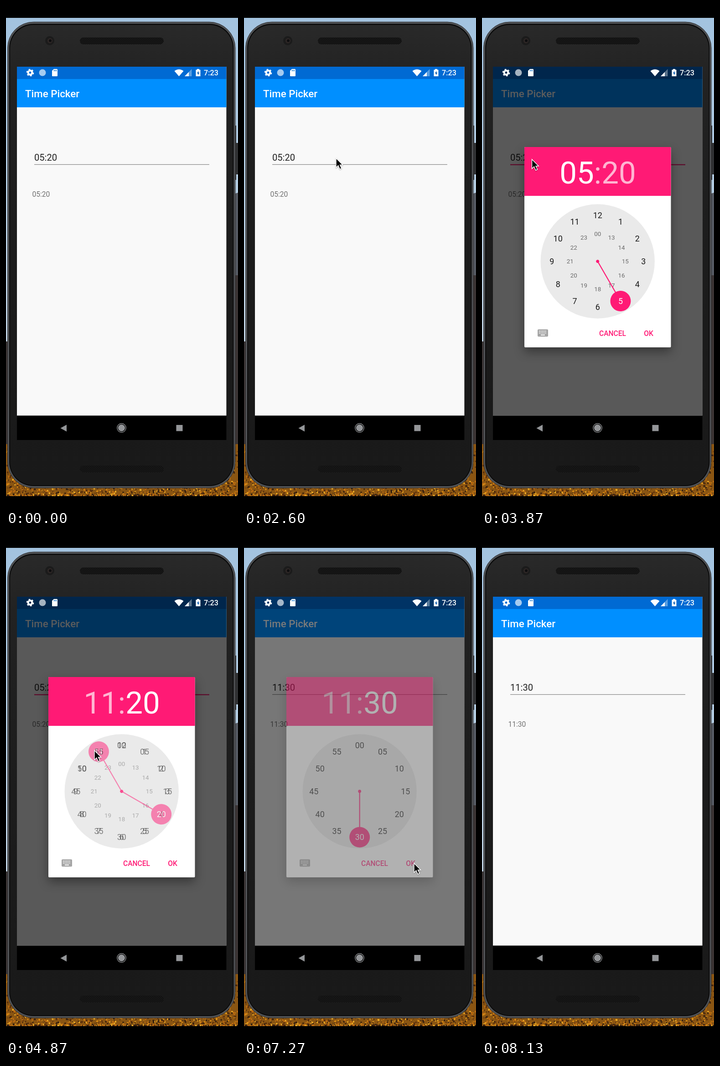
An HTML page for the animation above (8530 ms loop, 509 by 1100 pixels).

```html
<!DOCTYPE html>
<html lang="en">
<head>
<meta charset="utf-8">
<title>Time Picker</title>
<style>
  html, body { margin: 0; width: 100%; height: 100%; overflow: hidden; background: #000; }
  svg { display: block; font-family: Roboto, sans-serif; }
  .mid { text-anchor: middle; }
  .bold { font-weight: 500; }
  .shadow { filter: drop-shadow(0 10px 11px rgba(0, 0, 0, .38)); }
</style>
</head>
<body>
<svg width="509" height="1100" viewBox="0 0 509 1100">
  <defs>
    <linearGradient id="sky" x2="0" y2="1">
      <stop offset="0" stop-color="#a3c3df"/><stop offset=".5" stop-color="#b9cfe2"/><stop offset="1" stop-color="#c3cfda"/>
    </linearGradient>
    <linearGradient id="shell" x2="0" y2="1">
      <stop offset="0" stop-color="#292929"/><stop offset=".12" stop-color="#222"/>
      <stop offset=".5" stop-color="#1c1c1c"/><stop offset="1" stop-color="#191919"/>
    </linearGradient>
    <pattern id="mesh" width="4" height="4" patternUnits="userSpaceOnUse">
      <rect width="4" height="4" fill="#1d1d1d"/><circle cx="1" cy="1" r="1" fill="#060606"/><circle cx="3" cy="3" r="1" fill="#060606"/>
    </pattern>
    <g id="keys">
      <rect width="23" height="16" rx="2"/>
      <path d="M3 4h17M3 8h17" stroke="#fff" stroke-width="2" stroke-dasharray="2 1.4"/>
      <path d="M7 12.3h9" stroke="#fff" stroke-width="2"/>
    </g>
  </defs>

  <!-- landscape -->
  <rect y="26" width="509" height="1048" fill="url(#sky)"/>
  <path d="M490 415l19-6v340h-19z" fill="#555962"/>
  <path d="M490 590h19v370h-19zM0 735h12v230H0z" fill="#3b3434"/>
  <rect y="960" width="509" height="114" fill="#8a5512"/>
  <g id="leaves"></g>

  <!-- phone -->
  <path d="M500 262h5v38h4v69h-4v12h-5z" fill="#303133"/>
  <rect x="3.5" y="35" width="499.5" height="1021" rx="57" fill="#515356" stroke="#2c2d2f"/>
  <rect x="7" y="39" width="492.5" height="1013" rx="53" fill="#0a0a0a"/>
  <rect x="9" y="41.5" width="488.5" height="1008.5" rx="51" fill="url(#shell)"/>
  <rect x="162" y="69" width="184" height="15" rx="7.5" fill="url(#mesh)"/>
  <rect x="162" y="1007" width="184" height="15" rx="7.5" fill="url(#mesh)"/>
  <circle cx="96" cy="76" r="10" fill="#1b1b1b"/><circle cx="96.500" cy="76" r="5.500" fill="#2e2726"/><circle cx="97" cy="76" r="3" fill="#0d0d0f"/>

  <!-- app -->
  <rect x="24" y="133" width="459.500" height="818" fill="#000"/>
  <rect x="24" y="133" width="459.500" height="764.500" fill="#f9f9f9"/>
  <rect x="24" y="133" width="459.500" height="27" fill="#006ad3"/>
  <rect x="24" y="160" width="459.500" height="62" fill="#008fff"/>
  <text x="42" y="199.500" font-size="22.300" class="bold" fill="#fff">Time Picker</text>
  <text id="field" x="62" y="339" font-size="20.100" fill="#212121"></text>
  <rect id="line" x="62" width="384"/>
  <text id="label" x="57.500" y="418" font-size="15.600" fill="#707070"></text>
  <rect id="dim" x="24" y="133" width="459.500" height="764.500"/>

  <!-- status bar -->
  <g fill="#fff">
    <circle cx="53" cy="146" r="4.400" fill="none" stroke="#fff" stroke-width="4"/>
    <circle cx="53" cy="146" r="7.300" fill="none" stroke="#fff" stroke-width="2" stroke-dasharray="3.800 3.840"/>
    <circle cx="80" cy="146" r="7.500" opacity=".65"/>
    <path d="M105 138h6.500q1.500 0 1.500 1.500v13q0 1.500-1.500 1.500h-9q-1.500 0-1.500-1.500V142z"/>
    <path d="M105.500 140v3M108 140v3M110.500 140v3" stroke="#0069c8" stroke-width="1.200"/>
    <path d="M369.500 142.500q10-7.500 20 0l-10 11.500z"/>
    <path d="M392 154l15.500-16v16z" opacity=".35"/><path d="M392 154l9-9.300v9.300z"/>
    <path d="M419 138h5v1.800h2.500V154h-10v-14.200h2.500z"/>
    <path d="M422.300 142l-3.300 5.800h2v4l3.300-5.800h-2z" fill="#0058b0"/>
    <text x="434" y="152" font-size="16.200" class="bold">7:23</text>
  </g>

  <!-- navigation bar -->
  <g fill="#949699">
    <path id="back"/>
    <circle cx="253.500" cy="924.500" r="7.600"/>
    <circle cx="253.500" cy="924.500" r="9.700" fill="none" stroke="#a4a6a9" stroke-width="1.200"/>
    <rect x="373.500" y="918" width="14" height="13.500"/>
    <use id="ime" href="#keys" x="421" y="917"/>
  </g>

  <!-- dialog -->
  <g id="dialog">
    <rect x="93" y="309" width="321.500" height="439" rx="2" fill="#fff" class="shadow"/>
    <path d="M93 416V311q0-2 2-2h317.500q2 0 2 2v105z" fill="#ff1a75"/>
    <text x="254" y="389" font-size="67.200" class="mid" fill="#fff"><tspan id="hh"></tspan><tspan fill-opacity=".68">:</tspan><tspan id="mm"></tspan></text>
    <circle cx="253.700" cy="559.500" r="125.200" fill="#eaeaea"/>
    <g id="hours"><g id="hourNums"></g><g id="hourHand"></g></g>
    <g id="mins"><g id="minNums"></g><g id="minHand"></g></g>
    <use href="#keys" x="122" y="708.500" fill="#a5a5a5"/>
    <g font-size="15.600" class="mid bold" fill="#ff1a75">
      <text x="286.500" y="722.500">CANCEL</text><text x="365.500" y="722.500">OK</text>
    </g>
  </g>

  <path id="cursor" d="M0 0V20.500L4.700 16L8.300 24L12 22.400L8.500 14.700H14.700Z" fill="#000" stroke="#fff" stroke-width="1.400"
    style="filter: drop-shadow(0 1px 1px rgba(0, 0, 0, .35))"/>
</svg>
<script>
const $ = id => document.getElementById(id);
const set = (id, attrs) => { for (const k in attrs) $(id).setAttribute(k, attrs[k]); };
const CX = 253.7, CY = 559.5, OUTER = 100.5, INNER = 60.5;
const pad = n => String(n).padStart(2, '0');

// Foliage specks from a seeded generator
let seed = 7;
const rnd = () => (seed = seed * 16807 % 2147483647) / 2147483647;
$('leaves').innerHTML = ['#d98a12', '#f0ae25', '#5a2e0c', '#c06c10', '#38210f'].map(color => {
  let d = '';
  for (let i = 0; i < 420; i++) {
    const y = 1074 - 114 * rnd() ** 2, x = rnd() * 507, s = 1 + rnd() * 3;
    d += `M${x.toFixed(1)} ${Math.min(y, 1074 - s).toFixed(1)}h${s.toFixed(1)}v${s.toFixed(1)}h${(-s).toFixed(1)}z`;
  }
  return `<path d="${d}" fill="${color}"/>`;
}).join('');

// Dial parts
function num(text, step, r, size, fill) {
  const a = step * Math.PI / 6;
  return `<text class="mid" x="${CX + r * Math.sin(a)}" y="${CY - r * Math.cos(a) + size * .36}" font-size="${size}" fill="${fill}">${text}</text>`;
}
const ring = (label, r, size, fill) =>
  Array.from({ length: 12 }, (_, i) => num(label(i), i, r, size, fill)).join('');
const hand = (step, text) =>
  `<g transform="rotate(${step * 30} ${CX} ${CY})" fill="#ff1a75"><circle cx="${CX}" cy="${CY}" r="3.4"/>
   <rect x="${CX - 1.1}" y="${CY - OUTER}" width="2.2" height="${OUTER}"/>
   <circle cx="${CX}" cy="${CY - OUTER}" r="22.5"/></g>` + num(text, step, OUTER, 17.9, '#fff');

$('hourNums').innerHTML = ring(i => i || 12, OUTER, 17.9, '#1a1a1a')
  + ring(i => i ? i + 12 : '00', INNER, 13.4, '#6a6a6a');
$('minNums').innerHTML = ring(i => pad(i * 5), OUTER, 17.9, '#1a1a1a');

// Keys are [time, value...]; values ease between neighbours
function at(keys, t, ease = p => p) {
  let i = keys.findIndex(k => k[0] > t);
  if (i < 0) i = keys.length;
  if (i === 0) return keys[0].slice(1);
  const a = keys[i - 1], b = keys[i] || a;
  const p = b === a ? 0 : ease((t - a[0]) / (b[0] - a[0]));
  return a.slice(1).map((v, j) => v + (b[j + 1] - v) * p);
}
const smooth = p => p * p * (3 - 2 * p);

const enter = [[1200, 472, 602], [1667, 218, 335]];
const moves = [
  [2533, 218, 335], [2600, 202, 333.5], [2933, 109.5, 336],
  [3900, 109.5, 336], [4267, 133, 385], [4533, 194, 470],
  [5400, 194, 470], [5600, 151, 545], [5933, 258.5, 653],
  [6400, 258.5, 653], [6780, 387, 721], [7000, 373, 717]];
const dim = [[3400, 0], [3467, .22], [3533, .42], [3600, .555], [3733, .64],
  [7200, .64], [7267, .52], [7333, .36], [7400, .2], [7533, 0]];
const alpha = [[3400, 0], [3467, .35], [3533, .82], [3600, 1],
  [7200, 1], [7267, .43], [7333, .12], [7400, 0]];

function draw(t) {
  const hour = t < 4590 ? 5 : 11, min = t < 6060 ? 20 : 30;
  const value = t < 7260 ? '05:20' : '11:30';
  const focus = t >= 3260 && t < 7260, ime = t >= 3460 && t < 3790;
  const onMin = t >= 4660, swap = at([[4600, 0], [5130, 1]], t)[0];

  $('field').textContent = $('label').textContent = value;
  set('line', { y: focus ? 346.6 : 346.8, height: focus ? 2.2 : 1.2, fill: focus ? '#ff1a75' : '#858585' });
  set('dim', { opacity: at(dim, t)[0] });
  set('dialog', { opacity: at(alpha, t)[0] });
  set('back', { d: ime ? 'M119 918h15l-7.500 14z' : 'M119.500 925L133 917.500v15z' });
  set('ime', { opacity: +ime });

  $('hh').textContent = pad(hour);
  $('mm').textContent = min;
  set('hh', { 'fill-opacity': onMin ? .68 : 1 });
  set('mm', { 'fill-opacity': onMin ? 1 : .68 });
  $('hourHand').innerHTML = hand(hour, hour);
  $('minHand').innerHTML = hand(min / 5, min);
  set('hours', { opacity: 1 - swap });
  set('mins', { opacity: swap });

  const [x, y] = t < 2533 ? at(enter, t, p => p * (2 - p)) : at(moves, t, t < 2940 ? undefined : smooth);
  set('cursor', { transform: `translate(${x} ${y})`, opacity: +(t >= 1199 && t < 7590) });
}

let start;
function tick(now) {
  start ??= now;
  draw(Math.floor((now - start) % 8530 * .015 + .1) / .015);
  requestAnimationFrame(tick);
}
draw(0);
requestAnimationFrame(tick);
</script>
</body>
</html>
```
